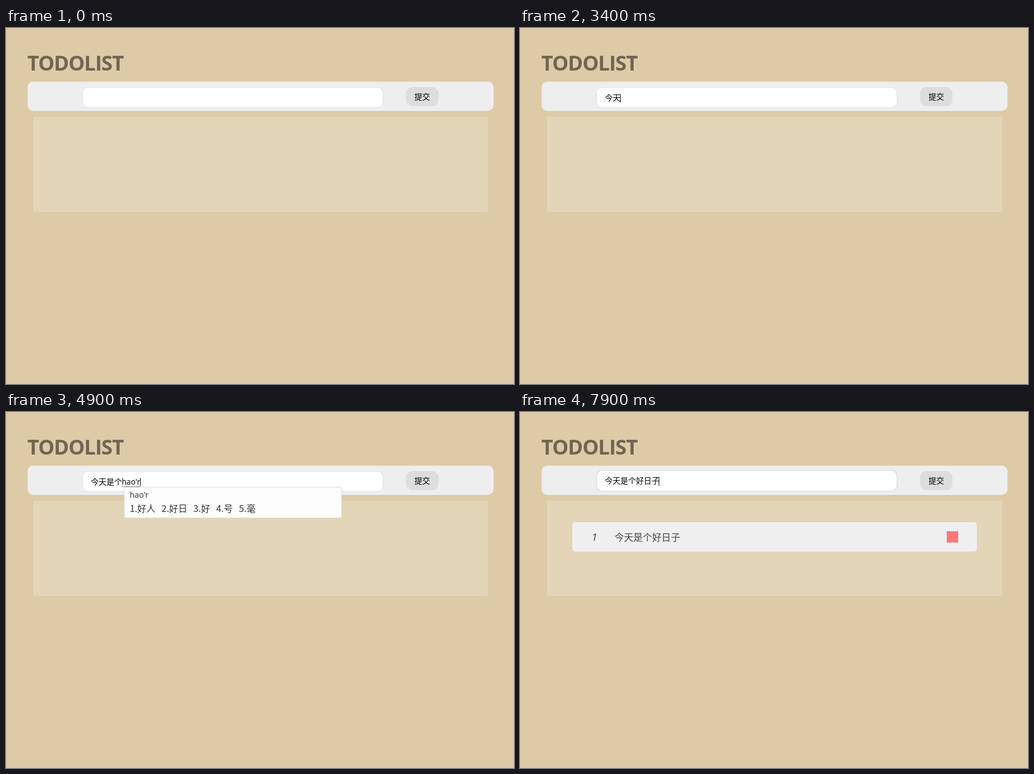
These frames come from a looping animation (894 by 627 pixels, 8 s). An HTML page:

```html
<!DOCTYPE html>
<html lang="zh-CN">
<head>
<meta charset="utf-8">
<title>Todo list</title>
<style>
  html, body { margin: 0; width: 100%; height: 100%; overflow: hidden; background: #ddcba7; }
  svg { display: block; width: 894px; height: 627px; }
  text { font-family: "Open Sans", "Noto Sans CJK SC", "Noto Sans CJK", sans-serif; white-space: pre; }
  .cjk { font-family: "Noto Sans CJK SC", "Noto Sans CJK", sans-serif; font-weight: 300; }
</style>
</head>
<body>
<svg viewBox="0 0 894 627">
  <text x="37.5" y="75" font-size="36" font-weight="700" letter-spacing="-1" fill="#6f6553">TODOLIST</text>
  <rect x="38" y="94.5" width="820" height="51.5" rx="10" fill="#eee"/>
  <rect x="48" y="156" width="800" height="168" fill="#e3d5b8"/>

  <rect id="field" x="134.5" width="529" rx="10" fill="#fff" stroke="#ddd"/>
  <text id="entry" class="cjk" x="149.4" font-size="13.7"></text>
  <text id="pinyin" font-size="13.7"></text>
  <path id="underline" stroke="#000" stroke-dasharray="1 1"/>
  <rect id="caret"/>

  <rect id="button" x="704.5" y="104.5" width="56" height="33" rx="10" stroke="#ddd"/>
  <text class="cjk" x="732.5" y="126.3" font-size="13.8" text-anchor="middle">提交</text>

  <g id="item" fill="#444">
    <rect x="92" y="194" width="712" height="52" rx="5" fill="#efefef"/>
    <text x="126" y="227" font-size="18" font-style="italic">1</text>
    <text class="cjk" x="166.5" y="226.8" font-size="16.5">今天是个好日子</text>
    <rect x="751" y="210" width="20" height="20" fill="#fb7878"/>
  </g>

  <g id="popup">
    <rect id="panel" y="132.5" height="54" rx="3" fill="#fdfdfd" stroke="#ddd"/>
    <text id="spelling" y="151" font-size="14" fill="#333"></text>
    <text id="choices" class="cjk" y="176" font-size="16" fill="#333"></text>
  </g>
</svg>
<script>
const $ = id => document.getElementById(id);
const set = (id, attrs) => { for (const k in attrs) $(id).setAttribute(k, attrs[k]); };
const show = (id, on) => set(id, { visibility: on ? "visible" : "hidden" });
const within = (t, a, b) => t >= a && t < b;

// time, committed text, spelling, popup right edge, candidates
const steps = [
  [0, ""],
  [2400, "", "j", 448, "就 家 见 叫 及"],
  [2600, "", "jin", 464, "进 金 今 近 仅"],
  [2800, "", "jin't", 530, "今天 金条 进 金 今"],
  [3000, "", "jin'ti", 530, "今天 金题 进 金 今"],
  [3100, "", "jin'tia", 530, "今天 金条 进 金 今"],
  [3200, "", "jin'tian", 530, "今天 金天 进 金 今"],
  [3400, "今天"],
  [3600, "今天", "s", 482, "是 说 上 时 三"],
  [3800, "今天", "sh", 506, "是 上 时 说 市"],
  [4000, "今天", "shi'g", 564, "是个 时光 事故 是 时"],
  [4100, "今天", "shi'ge", 564, "是个 十个 诗歌 是 时"],
  [4300, "今天是个"],
  [4400, "今天是个", "h", 510, "和 好 会 还 后"],
  [4500, "今天是个", "ha", 520, "哈 还 好 海 汉"],
  [4600, "今天是个", "hao", 564, "好 号 毫 浩 豪"],
  [4900, "今天是个", "hao'r", 591, "好人 好日 好 号 毫"],
  [5000, "今天是个", "hao'ri", 591, "好日 好 号 毫 浩"],
  [5300, "今天是个", "hao'ri'z", 591, "好日子 好日 好 号"],
  [5500, "今天是个好日子"]
];

function draw(t) {
  const [, text, spelling = "", right, words] = steps.findLast(s => s[0] <= t);
  const added = t >= 7200;
  const start = 149.5 + text.length * 13.55;

  set("field", { y: added ? 102.5 : 104.5, height: added ? 37 : 35.5, "stroke-width": added ? 1.5 : 1 });
  set("entry", { y: added ? 126.3 : 128 });
  $("entry").textContent = text;

  $("pinyin").textContent = spelling;
  set("pinyin", { x: start, y: 128 });
  const end = start + (spelling ? $("pinyin").getComputedTextLength() : 0);
  show("underline", spelling);
  set("underline", { d: `M${start} 131.5H${end}` });

  show("popup", spelling);
  if (spelling) {
    set("panel", { x: start + 4.5, width: right - start - 5 });
    set("spelling", { x: start + 14 });
    set("choices", { x: start + 14 });
    $("spelling").textContent = spelling;
    $("choices").textContent = words.split(" ").map((w, i) => `${i + 1}.${w}`).join("   ");
  }

  show("caret", within(t, 1100, 1600) || within(t, 2100, 6000) || within(t, 6500, 7000) || t >= 7900);
  const empty = !text && !spelling;
  set("caret", {
    x: empty ? 149 : Math.floor(end), y: added ? 114 : empty ? 115 : 116,
    width: empty ? 2 : 1, height: empty || added ? 16 : 15
  });

  set("button", { fill: within(t, 6800, 7500) ? "#aaa" : "#ddd" });
  show("item", added);
}

function frame() {
  draw(performance.now() % 8000);
  requestAnimationFrame(frame);
}
frame();
</script>
</body>
</html>
```
